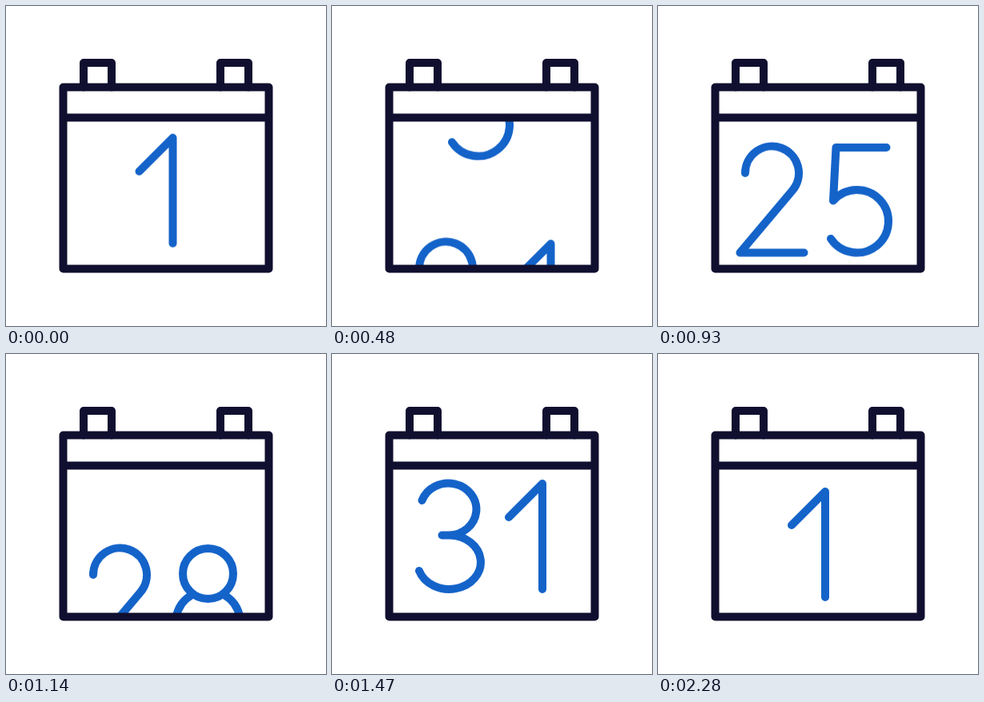
An HTML page without scripts that plays this animation: 400x400 px, repeating every 2.34 s.

```html
<!DOCTYPE html>
<html lang="en">
<head>
<meta charset="utf-8">
<title>Calendar</title>
<style>
  html, body { margin: 0; width: 100%; height: 100%; overflow: hidden; background: #fff; }
  svg { display: block; width: 100%; height: 100%; }
  svg * { stroke-linecap: round; stroke-linejoin: round; }
  .line { fill: none; stroke-width: 10; }
  .frame { stroke: #110f2f; }
  .days { stroke: #1463c9; animation: scroll 2340ms linear infinite; }

  /* Days sit 240px apart; the strip speeds up, overshoots slightly and settles. */
  @keyframes scroll {
    0% { transform: translateY(-7px); animation-timing-function: cubic-bezier(.33, .14, .67, .64); }
    11.538% { transform: translateY(-193px); }
    29.487% { transform: translateY(-517px); }
    48.718% { transform: translateY(-887px); }
    62.821% { transform: translateY(-1209px); animation-timing-function: cubic-bezier(.33, .53, .67, 1); }
    79.487% { transform: translateY(-1443px); animation-timing-function: ease-in-out; }
    97.436%, 100% { transform: translateY(-1440px); }
  }
</style>
</head>
<body>
<svg viewBox="0 0 400 400">
  <defs>
    <clipPath id="page"><rect x="71" y="139" width="258" height="190"/></clipPath>
    <path id="one" d="M167 42L209 0V132"/>
    <path id="two" d="M109 32A33.5 33.5 0 1 1 168 53.7L102.5 131.5H182.5"/>
    <path id="three" d="M112.5 21A35 32.5 0 1 1 146 64.5H137.5H147A39.5 33.7 0 1 1 109 109"/>
    <path id="five" d="M219.5 0H156.5L153 66.5A39.3 39.3 0 1 1 150 114"/>
    <g id="eight">
      <circle cx="252.5" cy="30.5" r="31.5"/>
      <path d="M232.5 57A40.5 40.5 0 1 0 272.5 57"/>
    </g>
  </defs>

  <g clip-path="url(#page)">
    <g class="line days">
      <use href="#one" x="-.5" y="172"/>
      <use href="#five" y="412"/>
      <g transform="translate(0 652)"><use href="#two"/><use href="#one" x="64.5" y="1"/></g>
      <g transform="translate(0 892)"><use href="#two"/><use href="#five" x="66"/></g>
      <g transform="translate(0 1132)"><use href="#two"/><use href="#eight"/></g>
      <g transform="translate(0 1372)"><use href="#three"/><use href="#one" x="54"/></g>
      <use href="#one" y="1612"/>
    </g>
  </g>

  <g class="line frame">
    <path d="M71.500 101.500H328.500V328.500H71.500ZM71.500 139.500H328.500"/>
    <path id="ring" d="M97 101.500V71H132V101.500"/>
    <use href="#ring" x="171"/>
  </g>
</svg>
</body>
</html>
```
